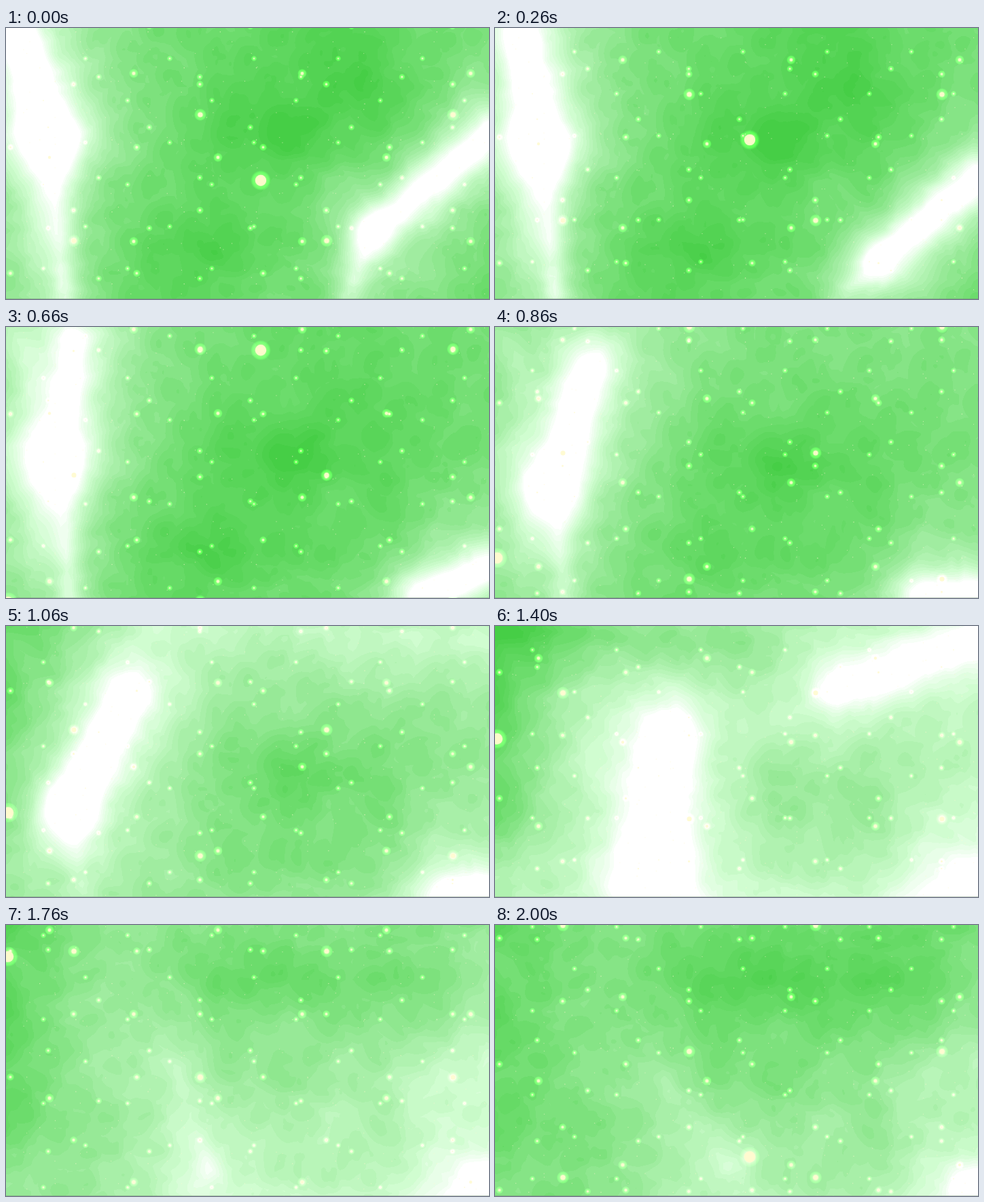
An HTML page with a canvas that plays this animation: 711x400 px, repeating every 2.03 s.

```html
<!DOCTYPE html>
<html lang="en">
<head>
<meta charset="utf-8">
<title>Green nebula</title>
<style>
  html, body { margin: 0; width: 100%; height: 100%; overflow: hidden; background: #74dc74; }
  canvas { display: block; width: 711px; height: 400px; }
</style>
</head>
<body>
<canvas id="sky" width="711" height="400"></canvas>
<script>
const W = 711, H = 400, LOOP = 2030, LAST = 58, CELL = 8, LEVELS = 24;
const ctx = document.getElementById('sky').getContext('2d');
const image = ctx.createImageData(W, H);
const pixels = new Uint32Array(image.data.buffer);

const clamp = v => Math.min(1, Math.max(0, v));
const lerp = (a, b, k) => a + (b - a) * k;
const ease = k => k * k * (3 - 2 * k);
const rise = (t, from, to) => ease(clamp((t - from) / (to - from)));
const fall = (t, from, to) => 1 - rise(t, from, to);
const bell = (t, mid, width) => Math.exp(-(((t - mid) / width) ** 2));

// Banded green ramp, stored as ABGR words.
const stops = [[70, 206, 70], [108, 220, 108], [160, 236, 160], [208, 253, 208], [255, 255, 255]];
const ramp = Array.from({ length: LEVELS + 1 }, (_, n) => {
  const v = n / LEVELS * (stops.length - 1), i = Math.min(stops.length - 2, Math.floor(v));
  const [r, g, b] = stops[i].map((c, ch) => Math.round(lerp(c, stops[i + 1][ch], v - i)));
  return (255 << 24 | b << 16 | g << 8 | r) >>> 0;
});

// Puffy texture: round dark cells with lighter seams, on a sheet tall enough to drift.
const SHEET = H + 80, PUFF = 46;
const hash = (x, y) => {
  const s = Math.sin(x * 127.1 + y * 311.7) * 43758.5453;
  return s - Math.floor(s);
};
function noise(x, y) {
  const xi = Math.floor(x), yi = Math.floor(y), u = ease(x - xi), v = ease(y - yi);
  return lerp(lerp(hash(xi, yi), hash(xi + 1, yi), u),
    lerp(hash(xi, yi + 1), hash(xi + 1, yi + 1), u), v) - .5;
}
function cells(x, y) {
  const xi = Math.floor(x), yi = Math.floor(y);
  let near = 9;
  for (let j = yi - 1; j <= yi + 1; j++) for (let i = xi - 1; i <= xi + 1; i++)
    near = Math.min(near, (i + hash(i, j) - x) ** 2 + (j + hash(i + 50, j) - y) ** 2);
  return Math.min(1, Math.sqrt(near)) - .45;
}
const puffs = new Float32Array(W * SHEET);
for (let y = 0; y < SHEET; y++) for (let x = 0; x < W; x++) {
  const big = noise(x / 80, y / 80), fine = noise(x / 11 + 90, y / 11);
  puffs[y * W + x] = big * .12 + cells(x / PUFF + fine * .3, y / PUFF + big) * .11 + fine * .03;
}

// The left light leans over and wanders to the middle: step, upper end, lower end.
const path = [[0, 15, 0, 65, 160], [18, 100, 20, 75, 200], [30, 180, 100, 95, 270],
  [40, 255, 165, 230, 370], [58, 250, 235, 340, 355]];
function leftLight(t) {
  const i = Math.max(1, path.findIndex(p => p[0] >= t));
  const a = path[i - 1], b = path[i], k = (t - a[0]) / (b[0] - a[0]);
  return a.map((v, n) => lerp(v, b[n], k)).slice(1);
}

// Strokes are [x1, y1, x2, y2, radius, gain]; a negative gain darkens.
function cloudAt(t) {
  const left = leftLight(t), [, , lx, ly] = left;
  const right = [540 + 4 * t, Math.min(400, 300 + 7 * t), W, Math.min(395, 155 + 11 * t)];
  const glowing = fall(t, 40, 50), late = rise(t, 42, 51);
  const base = .24 + .38 * bell(t, 40, 12) + .08 * late;
  return {
    base,
    strokes: [
      [...left, 30, .12 + glowing * (.48 - .3 * bell(t, 13, 7))],
      [...left, 100, .12 + .3 * glowing],
      [lx, ly, lx, ly, 34, .12 + .33 * glowing],
      [lx, ly, lx + 20, H + 10, 28, .45 * fall(t, 10, 46)],
      [30, 40, 40, 330, 90, .25 * fall(t, 18, 32)],
      [...right, 32, .65],
      [...right, 90, .35],
      [500, H, right[0], right[1], 24, .4 * fall(t, 0, 14)],
      [500, 95, W, 20, 38, .6 * bell(t, 40, 6)],
      [230, 0, W, 20, 60, .25 * bell(t, 31, 5)],
      [300, H, W, H, 90, .22 * rise(t, 26, 50)],
      [W, 200, 620, 230, 70, .25 * late],
      [400 + 2.5 * t, 130 + 3.4 * t, 420, 140 + 3.2 * t, 90, -.24 * fall(t, 42, 50)],
      [235, 325, 290, 330, 55, -.18 * fall(t, 18, 30)],
      [500, 0, 540, 90, 70, -.22 * fall(t, 4, 28)],
      [0, 0, 0, 260, 75, -.4 * rise(t, 22, 38) * fall(t, 40, 70)],
      [0, 0, 340, 30, 75, -.32 * bell(t, 40, 8)],
      [320, 80, 590, 80, 85, -.28 * late]
    ]
  };
}

function glow({ base, strokes }, x, y) {
  let sum = base;
  for (const [x1, y1, x2, y2, r, gain] of strokes) {
    const dx = x2 - x1, dy = y2 - y1, px = x - x1, py = y - y1;
    const k = clamp((px * dx + py * dy) / (dx * dx + dy * dy + .01));
    const d = Math.hypot(px - dx * k, py - dy * k) / r;
    if (d < 4) sum += gain * Math.exp(-(d ** 1.3));
  }
  return sum;
}

const COLS = Math.ceil(W / CELL) + 1, ROWS = Math.ceil(H / CELL) + 1;
const grid = new Float32Array(COLS * ROWS);

function drawCloud(step) {
  const cloud = cloudAt(step);
  for (let j = 0; j < ROWS; j++) for (let i = 0; i < COLS; i++)
    grid[j * COLS + i] = glow(cloud, i * CELL, j * CELL);
  const drift = 79 - Math.round(step * 1.1);
  for (let y = 0; y < H; y++) {
    const j = Math.floor(y / CELL), v = y / CELL - j;
    for (let x = 0; x < W; x++) {
      const i = Math.floor(x / CELL), u = x / CELL - i, g = j * COLS + i;
      const light = lerp(lerp(grid[g], grid[g + 1], u),
        lerp(grid[g + COLS], grid[g + COLS + 1], u), v) + puffs[(y + drift) * W + x];
      pixels[y * W + x] = ramp[Math.round(clamp(light) * LEVELS)];
    }
  }
  ctx.putImageData(image, 0, 0);
  ctx.fillStyle = 'rgba(110,140,110,.4)';
  ctx.fillRect(0, H - 1, W, 1);
}

// One seed star per depth; deeper layers are smaller, denser and slower.
const TILE = 744;
const seeds = [[375, 225], [286, 128], [312, 191], [6.5, 176], [136.5, 221], [241, 45],
  [528, 112], [398, 125], [72, 161.6], [35, 318]];

function dot(x, y, radius, fill) {
  ctx.fillStyle = fill;
  ctx.beginPath();
  ctx.arc(x, y, radius, 0, 7);
  ctx.fill();
}

function drawStar(x, y, depth) {
  const core = Math.max(.7, 8.2 / depth ** 1.2), halo = 15 / depth ** .7;
  if (depth < 7) {
    const g = ctx.createRadialGradient(x, y, core * .6, x, y, halo);
    g.addColorStop(0, 'rgba(130,255,90,.8)');
    g.addColorStop(.4, 'rgba(95,255,60,.35)');
    g.addColorStop(1, 'rgba(60,220,40,0)');
    ctx.globalCompositeOperation = 'lighter';
    dot(x, y, halo, g);
    ctx.globalCompositeOperation = 'source-over';
  }
  dot(x, y, core, `rgba(255,250,205,${Math.max(.5, 1 - depth * .06)})`);
}

function drawStars(step) {
  const scroll = Math.max(0, 10.9 * step - 5.5), pad = 18;
  for (let depth = seeds.length; depth > 0; depth--) {
    const [sx, sy] = seeds[depth - 1], period = TILE / depth;
    for (const shift of [0, period / 2]) {
      const wrap = v => ((v + shift + pad) % period + period) % period - pad;
      for (let y = wrap(sy - scroll / depth); y < H + pad; y += period)
        for (let x = wrap(sx); x < W + pad; x += period) drawStar(x, y, depth);
    }
  }
}

// The opening picture holds for 100 ms, then 30 steps a second.
const stepAt = ms => ms < 100 ? 0 : Math.min(LAST, 1 + Math.floor((ms - 93.3) * .03 + .001));

let shown = -1, start = null;
function tick(now) {
  if (start === null) start = now;
  const step = stepAt(Math.max(0, now - start) % LOOP);
  if (step !== shown) {
    shown = step;
    drawCloud(step);
    drawStars(step);
  }
  requestAnimationFrame(tick);
}
requestAnimationFrame(tick);
</script>
</body>
</html>
```
